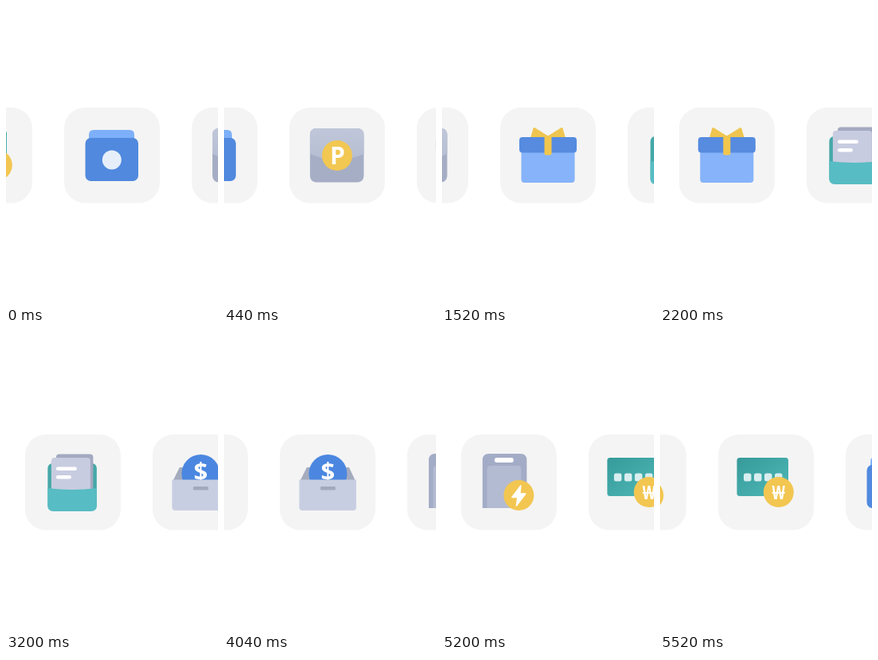
Recreate the animation shown at these times as an HTML page. Size 266 by 374 pixels, loop 6 s.

```html
<!DOCTYPE html>
<html lang="en">
<head>
<meta charset="utf-8">
<title>Icon carousel</title>
<style>
  html, body { margin: 0; width: 100%; height: 100%; overflow: hidden; background: #fff; }
  svg { display: block; width: 100%; height: 100%; }
  text { font-family: "Noto Sans", "Open Sans", sans-serif; font-weight: 700; fill: #fff; text-anchor: middle; }
</style>
</head>
<body>
<svg viewBox="0 0 266 374">
  <defs>
    <linearGradient id="teal" x1="0" y1="0" x2="1" y2="1">
      <stop offset="0" stop-color="#369a9a"/>
      <stop offset="1" stop-color="#4fb9b7"/>
    </linearGradient>
    <linearGradient id="steel" x1="0" y1="0" x2="0" y2="1">
      <stop offset="0" stop-color="#c0c7da"/>
      <stop offset="1" stop-color="#b5bdd2"/>
    </linearGradient>

    <g id="folder">
      <path d="M31 42V34q0-6 6-6h45q6 0 6 6v8z" fill="#7db0f8"/>
      <rect x="26.5" y="38" width="66.5" height="54" rx="7" fill="#5089de"/>
      <circle cx="59.8" cy="65.5" r="12" fill="#e6eefa"/>
    </g>

    <g id="points">
      <rect x="26" y="26" width="67.5" height="67.5" rx="8" fill="#a5aec5"/>
      <path d="M26 58V34q0-8 8-8h51.500q8 0 8 8v24q-33.500 15-67.500 0z" fill="url(#steel)"/>
      <circle cx="60" cy="60" r="19" fill="#f2c752"/>
      <text x="60.5" y="71" font-size="30">P</text>
    </g>

    <g id="gift">
      <path d="M26.500 54H93.500V90q0 4-4 4H30.500q-4 0-4-4z" fill="#86b3f9"/>
      <path d="M38 38L41.500 26q1-1.500 2.500-.5L60 35.500 76 25.500q1.500-1 2.500.5L82 38z" fill="#efc550"/>
      <rect x="24" y="37" width="72" height="19.500" rx="4" fill="#568be0"/>
      <rect x="55.500" y="35" width="9" height="24.500" rx="2" fill="#f2c64c"/>
    </g>

    <g id="docs">
      <rect x="28.500" y="36" width="61.500" height="59" rx="6" fill="#45a8a8"/>
      <rect x="39" y="24.500" width="46.500" height="60" rx="4" fill="#a3a9c0"/>
      <rect x="33" y="29" width="49" height="60" rx="4" fill="#c8cce0"/>
      <rect x="39" y="40.500" width="26" height="4.500" rx="2.250" fill="#fff"/>
      <rect x="39" y="51" width="19" height="4.500" rx="2.250" fill="#fff"/>
      <path d="M28.500 67q31 4 61.500 0v22q0 7-7 7H35.500q-7 0-7-7z" fill="#57bcc3"/>
    </g>

    <g id="cashbox">
      <path d="M34 41H87L95 58H25.500z" fill="#a5abbe"/>
      <circle cx="60.500" cy="49" r="24" fill="#4b87e0"/>
      <text x="60.500" y="57" font-size="31">$</text>
      <path d="M24.500 56.500H96V91q0 4-4 4H28.500q-4 0-4-4z" fill="#c8cee2"/>
      <rect x="51" y="65" width="19" height="4.500" rx="1.500" fill="#a3a9bd"/>
    </g>

    <g id="phone">
      <path d="M27 92V32q0-8 8-8h39.500q8 0 8 8v60z" fill="#a3acc6"/>
      <path d="M32.500 92V44q0-5 5-5h33q5 0 5 5v48z" fill="#b3bbd2"/>
      <rect x="42" y="29" width="24" height="6" rx="3" fill="#fff"/>
      <circle cx="72.500" cy="76" r="19" fill="#f2c651"/>
      <path d="M75 64L64 78.500h7L69.500 89 81 74h-7z" fill="#fff" stroke="#fff" stroke-width="1.500" stroke-linejoin="round"/>
    </g>

    <g id="card">
      <rect x="23.500" y="29" width="64.500" height="48" rx="3.500" fill="url(#teal)"/>
      <g fill="#d8eeef">
        <rect x="32" y="48.500" width="9.500" height="10" rx="2.500"/>
        <rect x="45" y="48.500" width="9.500" height="10" rx="2.500"/>
        <rect x="58" y="48.500" width="9.500" height="10" rx="2.500"/>
        <rect x="71" y="48.500" width="9.500" height="10" rx="2.500"/>
      </g>
      <circle cx="75.800" cy="72" r="19" fill="#f2c651"/>
      <text x="75.800" y="80.500" font-size="23">₩</text>
    </g>
  </defs>
  <rect width="266" height="374" fill="#fff"/>
  <g id="strip"></g>
</svg>
<script>
  const icons = ["folder", "points", "gift", "docs", "cashbox", "phone", "card"];
  const LOOP = 6000, BEAT = 1000, TICK = 40, STEPS = 13;
  const GAP = 160, LEFT = 73, TOP = 127;
  const strip = document.getElementById("strip");

  // One extra tile on each side so the neighbours are always visible.
  let tiles = "";
  for (let i = -1; i <= icons.length; i++) {
    const id = icons[(i + icons.length) % icons.length];
    tiles += `<g transform="translate(${i * GAP} 0)">
      <rect width="120" height="119.5" rx="26" fill="#f4f4f4"/><use href="#${id}"/></g>`;
  }
  strip.innerHTML = tiles;

  function slide(step) {
    if (step <= 0) return 0;
    if (step >= STEPS) return 1;
    const x = (step + 0.33) / 13.6;
    return x < 0.5 ? 2 * x * x : 1 - 2 * (1 - x) * (1 - x);
  }

  function draw(ms) {
    const t = ms % LOOP;
    const pos = Math.floor(t / BEAT) + slide(Math.floor((t % BEAT) / TICK));
    strip.setAttribute("transform", `translate(${LEFT - pos * GAP} ${TOP})`);
  }

  const start = performance.now();
  function tick() {
    draw(performance.now() - start);
    requestAnimationFrame(tick);
  }
  draw(0);
  requestAnimationFrame(tick);
</script>
</body>
</html>
```
